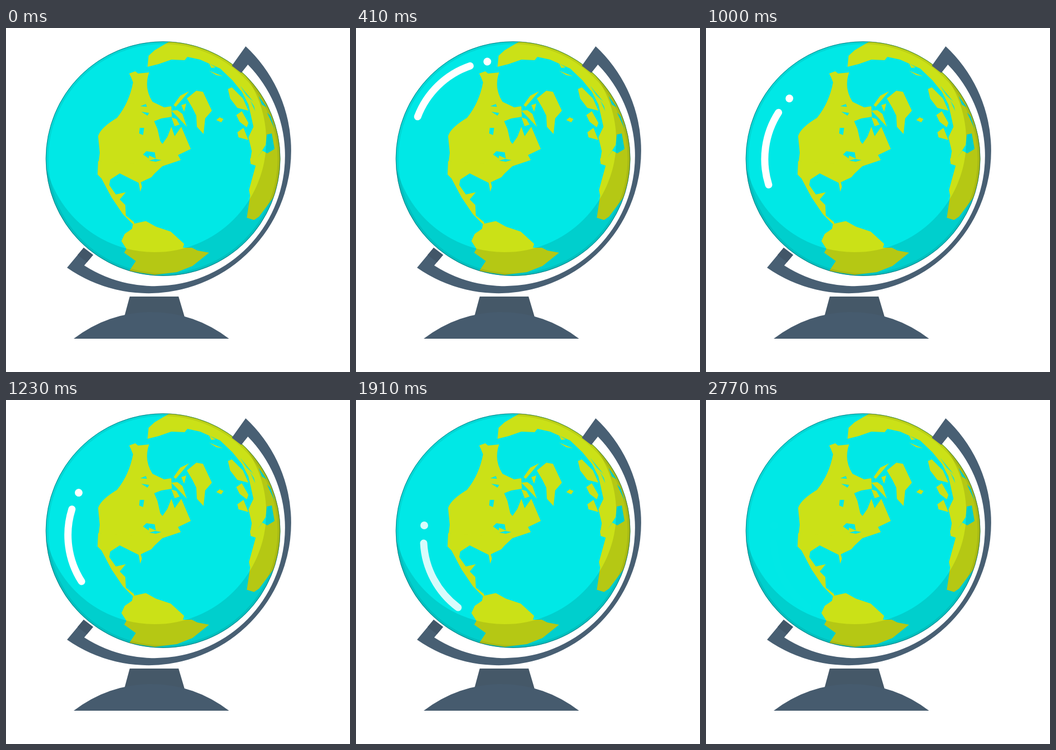
These frames come from a looping animation (620x620 px, 2.81 s). An HTML page:

```html
<!DOCTYPE html>
<html lang="en">
<head>
<meta charset="utf-8">
<title>Desk globe</title>
<style>
  html, body { margin: 0; width: 100%; height: 100%; overflow: hidden; background: #fff; }
  svg { display: block; width: 100vw; height: 100vh; }
  .land { fill: #cbe117; }
  .water { fill: #00e8e6; }
</style>
</head>
<body>
<svg viewBox="0 0 620 620">
  <defs>
    <clipPath id="ball"><circle cx="283" cy="235.5" r="211.3"/></clipPath>
  </defs>

  <g clip-path="url(#ball)">
    <rect class="water" width="620" height="620"/>

    <g class="land">
      <!-- Canada and Alaska -->
      <path d="M222 82L233 78 238 82 258 80Q248 108 264 133L285 143 298 141 299 160 280 163 267 168 273 182
        278 204 282 209 291 196 298 178 304 195 316 178 333 218 310 229 315 238 282 249H166L169 225 166 195
        Q170 180 200 162Q222 135 229 98L225 88Z"/>
      <!-- United States and Central America -->
      <path d="M166 240L283 248 268 262 262 269 243 278 245 286 242 295 239 279 205 262 188 273 186 283 198 300
        216 296 205 309 215 319 216 338 231 350V356L211 336 190 305 172 271 165 264Z"/>
      <!-- South America -->
      <path d="M208 384L214 371 227 362 229 353 252 348 270 358 297 367 321 389 319 396 335 396 345 401 366 405
        336 429 308 440 268 445 222 438 234 420 213 405 217 398Z"/>
      <!-- Eurasia -->
      <path d="M255 70L257 50 268 40 302 20H500V240H440L443 222 437 197 446 178 437 138 425 115 408 94
        386 73 350 57 327 52 322 58 298 57 275 65Z"/>
      <!-- Africa -->
      <path d="M440 235H500L488 285 483 304 456 340 447 346 434 342 440 302 438 292 450 248 441 245Z"/>
      <!-- Greenland and Iceland -->
      <path d="M326 127L343 113 355 115 371 149 359 163 356 191 344 178 343 158 336 144Z"/>
      <path d="M379 166L385 161 392 164 388 170Z"/>
      <!-- Arctic islands -->
      <path d="M302 139L314 122 330 114 306 142ZM298 149L309 148 318 155 326 178 308 159Z"/>
      <path d="M316 139L325 136 321 151ZM298 161L307 164 313 174 304 177Z"/>
      <path d="M366 77L391 87 379 85ZM366 64L378 71 370 72Z"/>
      <!-- Scandinavia and the North Sea islands -->
      <path d="M400 110L407 107 427 127 437 149 417 144 404 127Z"/>
      <path d="M415 157L425 150 437 171 434 179 421 169ZM417 188L428 180 437 202 419 197Z"/>
    </g>

    <g class="water">
      <!-- lakes -->
      <path d="M242 141L252 137 254 142ZM244 151L258 153 255 158ZM241 180H249L247 193 240 190Z"/>
      <path d="M247 228L253 222 268 224 270 235 258 230 257 235ZM258 239L269 236 280 238 270 241Z"/>
      <!-- inland seas -->
      <path d="M470 192L479 190 484 218 471 226 462 221 453 234 468 211ZM470 152L477 159 484 181Z"/>
      <path d="M455 122L470 143 461 138ZM422 104L446 133 434 122ZM440 130L447 141 449 150Z"/>
    </g>

    <path fill-opacity=".11" fill-rule="evenodd"
      d="M0 0H620V620H0ZM67 203a201 201 0 1 0 402 0a201 201 0 1 0-402 0"/>
    <circle cx="283" cy="235.5" r="209" fill="none" stroke="#000" stroke-opacity=".07" stroke-width="5"/>

    <g id="shine" fill="#fff" opacity="0">
      <path d="M122 258A155 155 0 0 0 184 374" fill="none" stroke="#fff" stroke-width="13" stroke-linecap="round"/>
      <circle cx="123" cy="226" r="7"/>
    </g>
  </g>
  <circle cx="283" cy="235.5" r="211" fill="none" stroke="#14545c" stroke-opacity=".65"/>

  <!-- stand -->
  <g fill="#485f73">
    <path d="M432 33A257 257 0 0 1 110 432L140 396 157 409 141 428A235 235 0 0 0 436 66L424 81 407 68Z"/>
    <path fill="#425668" d="M140 396L157 409 146 422 129 409Z"/>
    <path fill="#455868" d="M223 484H311L322 521H213Z"/>
    <path fill="#465b6e" d="M122 560A228 228 0 0 1 402 560Z"/>
  </g>
</svg>

<script>
  const LOOP = 2810, FPS = 22;
  const shine = document.getElementById('shine');

  // Sine ease from 0 to 1 between two times.
  function ease(time, start, end) {
    const u = Math.min(1, Math.max(0, (time - start) / (end - start)));
    return (1 - Math.cos(Math.PI * u)) / 2;
  }

  // The picture advances in steps, each starting on a multiple of 10 ms.
  function stepTime(time) {
    const tick = Math.floor(time / 10) * 10 + 5;
    return Math.floor(tick * FPS / 1000) * 1000 / FPS;
  }

  function draw(now) {
    const time = stepTime(now % LOOP);
    const angle = 84 * (1 - ease(time, 0, 1830));
    const opacity = ease(time, 0, 400) * (1 - ease(time, 1600, LOOP));
    shine.setAttribute('transform', `rotate(${angle} 289.5 218.6)`);
    shine.setAttribute('opacity', opacity);
  }

  const start = performance.now();
  function tick() {
    draw(performance.now() - start);
    requestAnimationFrame(tick);
  }
  tick();
</script>
</body>
</html>
```
